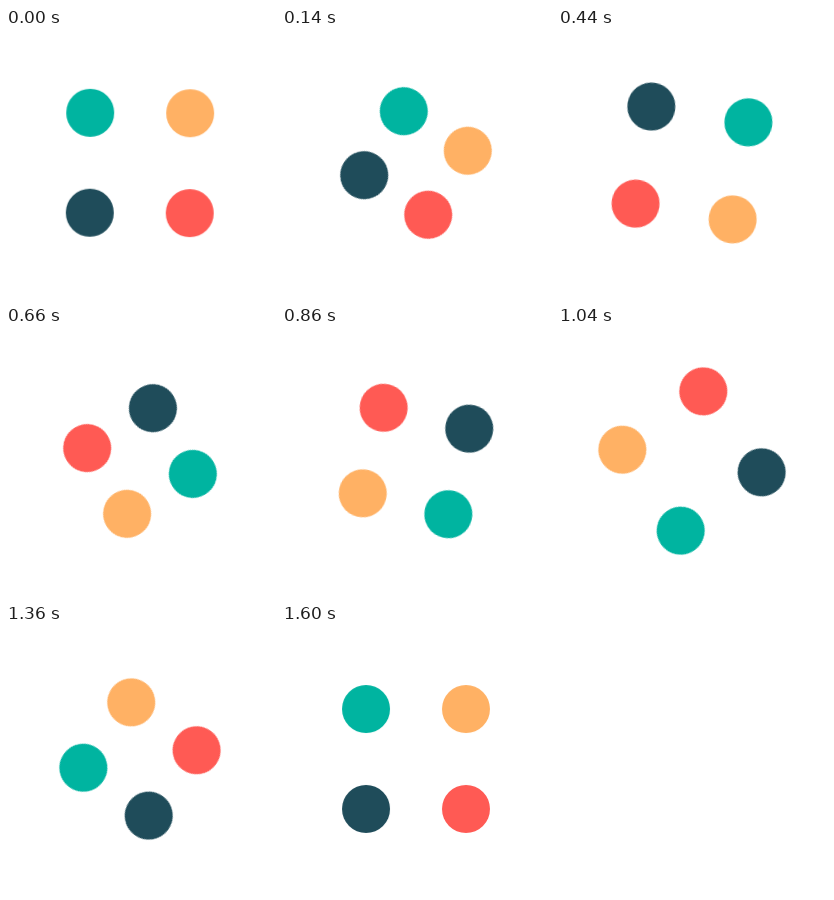
An HTML page for the animation above (1.62 s loop, 270x270 px).

```html
<!DOCTYPE html>
<html lang="en">
<head>
<meta charset="utf-8">
<title>Four dot loader</title>
<style>
  html, body {
    margin: 0;
    width: 100%;
    height: 100%;
    overflow: hidden;
    background: #fff;
  }

  .rotor {
    position: absolute;
    left: 134px;
    top: 135px;
    width: 0;
    height: 0;
    animation: spin 1620ms linear infinite;
  }

  .dot {
    position: absolute;
    left: -24px;
    top: -24px;
    width: 48px;
    height: 48px;
    border-radius: 50%;
    background: var(--color);
    animation: pulse 540ms ease infinite;
  }

  .teal   { --x: -1; --y: -1; --color: #00b4a0; }
  .amber  { --x: 1;  --y: -1; --color: #ffb164; }
  .navy   { --x: -1; --y: 1;  --color: #1f4c5a; }
  .red    { --x: 1;  --y: 1;  --color: #ff5a54; }

  /* One full turn in 1600 ms, then a short rest before the loop restarts. */
  @keyframes spin {
    0% { transform: rotate(0deg); }
    98.7654%, 100% { transform: rotate(360deg); }
  }

  @keyframes pulse {
    0%, 100% { transform: translate(calc(var(--x) * 50px), calc(var(--y) * 50px)); }
    40% { transform: translate(calc(var(--x) * 36.5px), calc(var(--y) * 36.5px)); }
  }
</style>
</head>
<body>
  <div class="rotor">
    <div class="dot teal"></div>
    <div class="dot amber"></div>
    <div class="dot navy"></div>
    <div class="dot red"></div>
  </div>
</body>
</html>
```
